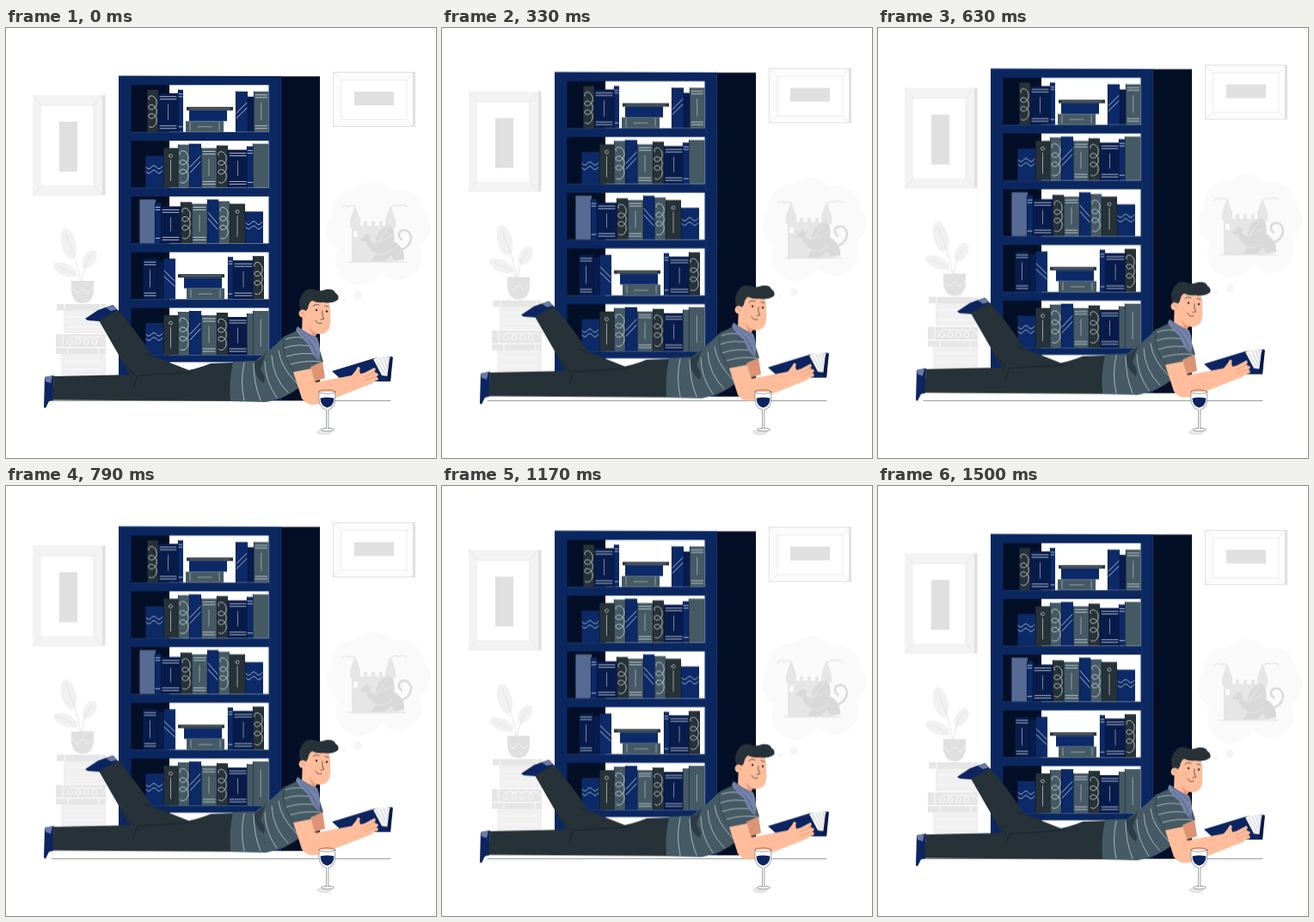
These frames come from a looping animation (500 px wide and 500 px high, 1540 ms). An HTML page:

```html
<!DOCTYPE html>
<html lang="en">
<head>
<meta charset="utf-8">
<title>Evening reader</title>
<style>
  html, body { margin: 0; width: 100%; height: 100%; overflow: hidden; background: #fff; }
  svg { display: block; width: 100vw; height: 100vh; }
  .bob { animation: bob 1540ms linear infinite; }
  @keyframes bob {
    0%, 100% { transform: translateY(0); }
    46.8% { transform: translateY(-9.6px); }
    95.5% { transform: translateY(.4px); }
  }
  .line { fill: none; stroke-linecap: round; stroke-linejoin: round; }
</style>
</head>
<body>
<svg viewBox="0 0 500 500">
  <path class="line" d="M53 433.400H447" stroke="#263238" stroke-width=".5"/>

  <g class="bob">
    <!-- pictures -->
    <path d="M31 78H115.500V194.500H31Z" fill="#e0e0e0"/>
    <path d="M31 78H112V194.500H31Z" fill="#f3f3f3"/>
    <path d="M41 90H102V183H41Z" fill="#fff"/>
    <path d="M62 109H83V167H62Z" fill="#e0e0e0"/>
    <path class="line" d="M31 78L41 90H102L112 78M31 194L41 183M102 90V183L112 194" stroke="#e2e2e2" stroke-width=".7"/>
    <path d="M380 51H476V115H380Z" fill="#e0e0e0"/>
    <path d="M381 52H473V114H381Z" fill="#fcfcfc"/>
    <path d="M390 60.500H473V106.500H390Z" fill="#fff"/>
    <path d="M405 74H451V90H405Z" fill="#e0e0e0"/>
    <path class="line" d="M381 52L390 60.500H466L473 52M381 114L390 106.500H466L473 114M390 60.500V106.500M466 60.500V106.500" stroke="#e6e6e6" stroke-width=".7"/>

    <!-- plant and pile -->
    <g fill="#f1f1f1">
      <ellipse cx="73" cy="251" rx="8.500" ry="18" transform="rotate(-14 73 251)"/>
      <ellipse cx="69" cy="281" rx="15" ry="7" transform="rotate(24 69 281)"/>
      <ellipse cx="97" cy="269" rx="7" ry="12" transform="rotate(32 97 269)"/>
    </g>
    <path class="line" d="M70 240Q82 268 87 294M60 277Q80 284 87 294M99 264Q90 276 88 294" stroke="#e0e0e0" stroke-width=".8"/>
    <path d="M76 294H102V306Q100 320 89 320T76 306Z" fill="#e0e0e0"/>
    <path class="line" d="M77 303L83 309L89 303L95 309L101 303" stroke="#f5f5f5"/>
    <path d="M67 328H116V355H67ZM64 379H116V405H64Z" fill="#f0f0f0"/>
    <path d="M59 321H116V328.500H59ZM58 356H116V371H58ZM58 372H116V379H58Z" fill="#e6e6e6"/>
    <path class="line" d="M68 321V328M110 321V328M72 372V379M108 372V379M66 356V371M70 336H112M70 348H112M68 387H112M68 397H112" stroke="#fafafa"/>
    <path class="line" id="pile" stroke="#fff"/>

    <!-- daydream -->
    <g fill="#fafafa">
      <circle cx="428" cy="207" r="29"/><circle cx="460" cy="214" r="26"/>
      <circle cx="469" cy="231" r="25"/><circle cx="456" cy="265" r="28"/>
      <circle cx="411" cy="271" r="28"/><circle cx="398" cy="234" r="26"/>
      <circle cx="404" cy="212" r="25"/><circle cx="432" cy="240" r="35"/>
    </g>
    <circle cx="409" cy="311" r="4.800" fill="#f5f5f5"/>
    <circle cx="393" cy="316" r="2" fill="#f5f5f5"/>
    <path d="M402 272V232H400V223L406 206L412 223V230H416V225H420V230H425V225H429V230H434V225H438V230H441V223L447 206L453 223V232H451V272Z" fill="#e6e6e6"/>
    <path class="line" d="M390 209Q395 204 398 208Q402 205 407 209M448 209Q452 204 456 207Q461 204 466 208" stroke="#e6e6e6" stroke-width="1.200"/>
    <path d="M404 236H409V243H404ZM444 236H449V243H444Z" fill="#fafafa"/>
    <path d="M411 247L419 239L424 242L423 248L430 251Q429 235 446 229Q454 238 451 248Q464 255 463 269L452 271L448 264L440 271H425L430 262Q420 256 419 249Z" fill="#d9d9d9"/>
    <path class="line" d="M431 250L445 231M431 250L450 241M428 263Q440 266 450 257" stroke="#ececec" stroke-width=".8"/>
    <path class="line" d="M456 259Q471 255 471 243Q468 232 459 236Q454 241 460 246" stroke="#dadada" stroke-width="2.600"/>
    <path class="line" d="M398 272H465" stroke="#dfdfdf"/>

    <!-- bookcase -->
    <path d="M320 56.300H365V433H320Z" fill="#030f26"/>
    <path d="M131 55.500L320 56V433H131Z" fill="#0b2760"/>
    <path class="line" d="M307 66V433M319.500 56V433" stroke="#274078" stroke-width=".5"/>
    <g id="shelves"></g>

    <!-- legs -->
    <path d="M45 406L56 404L55 433L50 434L46 442L44 441Z" fill="#0c2560"/>
    <path d="M45 406L54 404L52 413L46 411Z" fill="#6b7ba3"/>
    <path d="M56 405L150 403Q205 404 238 390L292 388L290 434L54 432.500Z" fill="#263238"/>
    <path d="M92 338L107 328L124 322L131 329L109 341L95 340Z" fill="#0c2560"/>
    <path d="M116 325L125 322L129 327L122 329Z" fill="#6b7ba3"/>
    <path d="M108 340L130 328Q151 351 170 381L218 400L232 404L200 418L149 408Q142 400 139 394Z" fill="#263238"/>
    <path class="line" d="M148 418L153 404Q190 402 217 400M149 404L139 391M170 382L160 378" stroke="#111b20" stroke-width=".6"/>

    <!-- torso -->
    <path d="M264 388L290 387Q306 376 323 359L342 350L360 359L369 388L355 398L335 400L342 417Q326 431 302 435L261 434Q259 410 264 388Z" fill="#455a64"/>
    <path d="M289 388Q300 384 303 375L296 397Q303 406 300 413Q288 406 289 388Z" fill="#2d3c44"/>
    <path class="line" d="M277 389Q272 411 277 433M288 390Q288 414 296 433M301 388Q301 410 315 430M309 381Q310 406 328 424M317 375Q319 394 338 413M325 362Q338 357 352 362M324 372Q339 366 359 371M326 382Q344 376 363 380M331 391Q348 386 366 388" stroke="#d5dde1" stroke-width=".7"/>
    <path class="line" d="M323 362Q320 382 335 400" stroke="#2d3c44" stroke-width=".7"/>

    <!-- book and arm -->
    <path d="M379 399L428 384L449 382L447 411L434 411L390 409Z" fill="#0c2560"/>
    <path d="M427 385Q438 380 447 383L445 405L437 404Z" fill="#f6f6f6"/>
    <path class="line" d="M431 386L440 402M435 384L443 402M439 383L445 400M443 383L446 396" stroke="#a9b2bd" stroke-width=".5"/>
    <path d="M446 384L450 382.500L447 411L443 408Z" fill="#081a47"/>
    <path d="M354 394L368 388L371 407L358 411Z" fill="#dc9474"/>
    <path d="M334 400L355 396Q357 406 360 412L402 404L410 394L412 402L429 399L432 408L424 414L411 419L368 436Q352 442 344 431Z" fill="#ffbd9b"/>
    <g class="line" stroke="#ffbd9b" stroke-width="3.600">
      <path d="M405 406L410 396M413 405L428 397M415 408L431 403M416 411L431 408"/>
    </g>
    <path class="line" d="M416 406L429 400M417 410L431 405M358 411L366 409" stroke="#d98e70" stroke-width=".6"/>

    <!-- head -->
    <path d="M345 325H376Q379 344 375 351Q369 358 361 355L356 364L344 354Z" fill="#ffbd9b"/>
    <path d="M352 347Q357 354 362 355L358 361Z" fill="#e79b7b"/>
    <path d="M348 311H374L377 326V344H349L344 330Z" fill="#ffbd9b"/>
    <path d="M342 328Q339 315 345 309Q349 302 358 304Q364 307 372 304Q381 303 383 308Q388 311 386 316Q379 321 369 319Q362 320 356 317Q352 319 351 326L348 330Z" fill="#263238"/>
    <circle cx="345" cy="332" r="4.500" fill="#ffbd9b"/>
    <path class="line" d="M343 331Q346 329 347 334" stroke="#c87f62" stroke-width=".6"/>
    <path class="line" d="M357 323Q360 320 364 322M371 323L375 324M368 329Q367 335 370 338L366 339M360 340Q362 345 367 343" stroke="#263238" stroke-width=".7"/>
    <circle cx="361" cy="328" r="1.200" fill="#263238"/>
    <circle cx="373" cy="329.500" r="1.200" fill="#263238"/>
    <path d="M339 347Q350 355 362 360Q367 372 364 387Q355 380 351 367Q341 359 337 351Z" fill="#7583a8"/>
    <path class="line" d="M341 350Q356 358 361 366M343 355Q355 363 361 379M352 363Q357 369 363 384" stroke="#4f5f8a" stroke-width=".7"/>
  </g>

  <!-- glass -->
  <ellipse cx="370" cy="470" rx="9" ry="3.500" fill="#e6e6e6"/>
  <path d="M364 423H382.500Q385 442 373.500 444Q362 442 364 423Z" fill="#fff"/>
  <path d="M365.500 430.500Q373 428.500 381.500 430.500Q381 440 373.500 441.500Q366 440 365.500 430.500Z" fill="#0c2560"/>
  <ellipse cx="374" cy="467" rx="7.500" ry="1.800" fill="#fff" stroke="#263238" stroke-width=".45"/>
  <path d="M372.600 444H374.800V466H372.600Z" fill="#fff"/>
  <g class="line" stroke="#263238" stroke-width=".45">
    <ellipse cx="373.300" cy="423" rx="9.300" ry="2.200"/>
    <path d="M364 423Q362 442 372.500 444V466M382.500 423Q385 442 374.800 444V466"/>
  </g>
</svg>

<script>
  const NAVY = '#081c4c', BLUE = '#0c2a68', DARK = '#263238', GRAY = '#455a64', PALE = '#566a94';
  const INK = '#e6ebef';
  const out = [];

  const rect = (x, y, w, h, fill) =>
    out.push(`<rect x="${x}" y="${y}" width="${w}" height="${h}" fill="${fill}"/>`);
  const stroke = (d, color = INK, width = 0.75) =>
    out.push(`<path class="line" d="${d}" stroke="${color}" stroke-width="${width}"/>`);
  const curve = (n, point) =>
    'M' + Array.from({ length: n + 1 }, (_, i) => point(i / n).map(v => v.toFixed(1)).join(' ')).join('L');

  const marks = {
    loops: (x, y, w, h) => stroke(curve(72, t => {
      const a = t * Math.PI * 6 + 2.6;
      return [x + w / 2 + Math.cos(a) * w * 0.36, y + 9 + t * (h - 18) + Math.sin(a) * 5];
    })),
    diag: (x, y, w, h) =>
      stroke(`M${x + 1} ${y + h * 0.53}L${x + w - 1} ${y + h * 0.28}M${x + 1} ${y + h * 0.66}L${x + w - 1} ${y + h * 0.41}`),
    slope: (x, y, w, h) =>
      stroke(`M${x + 1} ${y + h * 0.3}L${x + w - 1} ${y + h * 0.55}M${x + 1} ${y + h * 0.44}L${x + w - 1} ${y + h * 0.68}`),
    wave: (x, y, w, h) => [0.36, 0.5].forEach(k =>
      stroke(curve(24, t => [x + 1 + t * (w - 2), y + h * k + Math.sin(t * 10) * 1.8]))),
    bands: (x, y, w, h) => {
      const b = y + h, l = x + 2, r = w - 4;
      stroke(`M${l} ${y + 4}h${r}M${l} ${y + 7}h${r}M${l} ${b - 7}h${r}M${l} ${b - 4}h${r}`);
      stroke(`M${x + w / 2} ${y + 13}V${b - 14}`, INK, 0.5);
    },
    caps: (x, y, w, h) => stroke(`M${x + 1} ${y + 5}h${w - 2}M${x + 1} ${y + 8}h${w - 2}M${x + 1} ${y + h - 6}h${w - 2}`),
    ring: (x, y, w, h) => stroke(
      `M${x + w / 2 - 2} ${y + 9}a2 2 0 1 0 4 0a2 2 0 1 0 -4 0M${x + w / 2} ${y + 14}V${y + h - 8}`, INK, 0.6),
    spine: (x, y, w, h) => stroke(`M${x + w / 2} ${y + 10}V${y + h - 10}`, INK, 0.5),
  };

  // Each book: left, right, height, colour, mark
  const low = [
    [162, 183, 37, BLUE, 'wave'], [183, 200, 46, DARK, 'ring'], [200, 214, 50, GRAY, 'loops'],
    [213, 227, 51, BLUE, 'diag'], [227, 245, 46, GRAY, 'bands'], [245, 258, 49, DARK, 'loops'],
    [258, 281, 44, NAVY, 'bands'], [280, 288, 48, BLUE, 'caps'], [287, 305.5, 51, GRAY],
  ];
  const rows = [
    [[164, 177, 49, DARK, 'loops'], [177, 200, 45, NAVY, 'bands'], [200, 206, 49, BLUE, 'caps'],
     [267, 281, 47, BLUE, 'diag'], [281, 289, 41, NAVY], [288, 305.5, 47, GRAY, 'bands']],
    low,
    [[155, 174, 51, PALE], [173, 180, 47, BLUE, 'caps'], [180, 203, 43, NAVY, 'bands'],
     [203, 216, 48, DARK, 'loops'], [216, 234, 46, GRAY, 'bands'], [234, 247, 51, BLUE, 'slope'],
     [247, 260, 49, GRAY, 'loops'], [260, 278, 46, DARK, 'ring'], [278, 299, 37, BLUE, 'wave']],
    [[159, 176, 47, NAVY, 'bands'], [176, 183, 44, NAVY], [183, 197, 47, BLUE, 'slope'],
     [258, 264, 49, BLUE, 'caps'], [264, 288, 45, NAVY, 'bands'], [287, 300, 50, DARK, 'loops']],
    low.map((b, i) => i === 7 ? [280, 288, 48, GRAY] : i === 8 ? [...b, 'spine'] : b),
  ];
  const stacks = { 0: [210, 213, 209], 3: [200, 207, 210] };

  function bay(y, h) {
    rect(145.5, y, 44.5, h, '#030f26');
    rect(190, y, 115.5, h, '#fff');
  }

  function stack([a, b, c], base) {
    rect(a, base - 29, 54, 4, DARK);
    rect(b, base - 25, 44, 12.5, BLUE);
    rect(c, base - 12.5, 44, 12.5, GRAY);
    stroke(`M${a + 4} ${base - 27}h46`, INK, 0.4);
    stroke(`M${c + 5} ${base - 11}v9M${c + 39} ${base - 11}v9M${c + 14} ${base - 6}h16`, INK, 0.5);
  }

  rows.forEach((row, i) => {
    const top = 66.3 + i * 64.8, base = top + 54.5;
    bay(top, 54.7);
    for (const [l, r, h, color, mark] of row) {
      const box = [l, base - h, r - l, h];
      rect(...box, color);
      stroke(`M${l + 0.3} ${base - h}V${base}`, '#04102b', 0.5);
      if (mark) marks[mark](...box);
    }
    if (stacks[i]) stack(stacks[i], base);
    stroke(`M146 ${base + 0.4}H305`, '#4a5f8c', 0.4);
  });
  bay(388.5, 44.5);

  document.getElementById('shelves').innerHTML = out.join('');
  document.getElementById('pile').setAttribute('d', curve(80, t => {
    const a = t * Math.PI * 8;
    return [72 + t * 38 + Math.cos(a) * 5, 363.5 + Math.sin(a) * 4.5];
  }));
</script>
</body>
</html>
```
